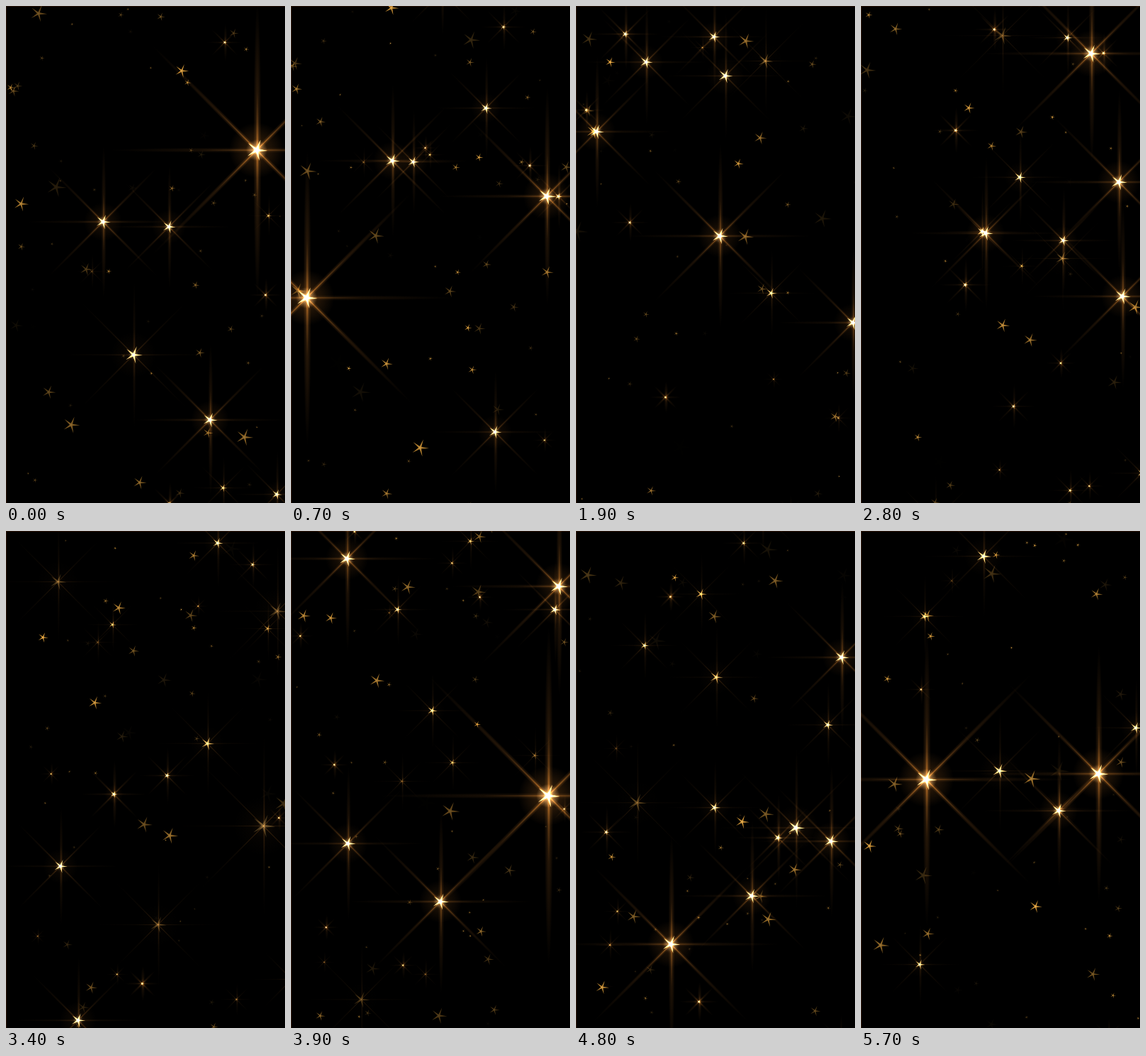
Animation of 394x700 px, one loop 5.8 s. Source, as an HTML page with a canvas:

```html
<!DOCTYPE html>
<html lang="en">
<head>
<meta charset="utf-8">
<title>Golden stars</title>
<style>
html, body { margin: 0; width: 100%; height: 100%; overflow: hidden; background: #000; }
canvas { display: block; }
</style>
</head>
<body>
<canvas id="sky" width="394" height="700"></canvas>
<script>
const ctx = document.getElementById('sky').getContext('2d');
const W = 394, H = 700, LOOP = 5800, STEP = 100;
const TAU = Math.PI * 2;
const FLASH = 650; // ms from dark to the peak of a large flare

let seed = 29;
function rnd() {
  seed = (seed * 16807) % 2147483647;
  return seed / 2147483647;
}

// The large flares: peak time, x, y, radius.
const flares = [
  [0, 354, 203, 13], [0, 137, 304, 9], [0, 230, 311, 8], [0, 288, 583, 9],
  [700, 22, 411, 13], [700, 361, 268, 11], [700, 143, 218, 9], [700, 288, 600, 8],
  [1900, 203, 324, 10], [1900, 29, 177, 9], [1900, 99, 79, 8], [1900, 391, 446, 9],
  [2800, 325, 67, 11], [2800, 364, 248, 10], [2800, 369, 409, 10], [2800, 176, 320, 9],
  [3900, 363, 373, 14], [3900, 211, 522, 10], [3900, 378, 78, 11], [3900, 79, 39, 10],
  [4800, 134, 582, 11], [4800, 375, 178, 9], [4800, 360, 437, 9], [4800, 248, 514, 9],
  [5700, 92, 350, 13], [5700, 335, 342, 12], [5700, 279, 394, 9]
].map(([peak, x, y, r]) => ({ peak, x, y, r, drift: (rnd() - .5) * 26 }));

// Small stars are born at random, rise, grow and dim; some flare on the way.
const stars = Array.from({ length: 290 }, () => {
  const life = 1400 + rnd() * 900;
  return {
    life,
    birth: rnd() * (LOOP + life) - life,
    x: rnd() * W,
    y: rnd() * (H + 60),
    r: 2 + 9 * rnd() ** 2,
    tone: .35 + rnd() * .65,
    flare: rnd() < .2 ? .7 + rnd() * 1.2 : 0,
    drift: (rnd() - .5) * 26
  };
});

// Soft ellipse; long and thin it becomes a ray.
function glow(x, y, rx, ry, angle, rgb, alpha) {
  ctx.save();
  ctx.translate(x, y);
  ctx.rotate(angle);
  ctx.scale(rx, ry);
  const g = ctx.createRadialGradient(0, 0, 0, 0, 0, 1);
  g.addColorStop(0, `rgba(${rgb},${alpha})`);
  g.addColorStop(.15, `rgba(${rgb},${alpha * .6})`);
  g.addColorStop(.4, `rgba(${rgb},${alpha * .22})`);
  g.addColorStop(1, `rgba(${rgb},0)`);
  ctx.fillStyle = g;
  ctx.fillRect(-1, -1, 2, 2);
  ctx.restore();
}

function starShape(x, y, r, color) {
  ctx.beginPath();
  for (let i = 0; i < 10; i++) {
    const a = i * TAU / 10 + .06, d = i % 2 ? r * .18 : r;
    ctx.lineTo(x + Math.cos(a) * d, y + Math.sin(a) * d);
  }
  ctx.fillStyle = color;
  ctx.fill();
}

function drawRays(x, y, r, flare) {
  const len = r * (8 + 2 * flare), thick = 1 + flare * .7;
  const alpha = Math.min(.75, .2 + flare * .15);
  const ray = '215,130,45';
  glow(x + 1, y, thick * 1.5, len, 0, ray, alpha);
  glow(x, y, len, thick, 0, ray, alpha * .65);
  for (const side of [-1, 1]) glow(x, y, len, thick, side * TAU / 8, ray, alpha);
  glow(x, y, r * 3, r * 3, 0, '225,135,45', Math.min(.8, flare * .18));
}

function drawStar(x, y, r, light, flare) {
  if (flare > .1) drawRays(x, y, r, flare);
  const heat = Math.min(1, flare);
  starShape(x, y, r * 1.2, `rgba(242,${172 + heat * 45},${62 + heat * 75},${light})`);
  const core = r * (.35 + heat * .3 + flare * .12);
  glow(x, y, core, core, 0, '255,248,215', light * (.3 + heat * .7));
}

function drawMoving(s, dt, r, light, flare) {
  const rise = 15 + s.r * 5;
  drawStar(s.x + s.drift * dt / 1000, s.y - rise * dt / 1000, r, light, flare);
}

function draw(t) {
  ctx.globalCompositeOperation = 'source-over';
  ctx.fillStyle = '#000';
  ctx.fillRect(0, 0, W, H);
  ctx.fillStyle = '#241004';
  ctx.fillRect(0, 0, 1, H);
  ctx.fillRect(0, 0, W, 1);
  ctx.globalCompositeOperation = 'lighter';

  for (const s of stars) {
    const age = t - s.birth, p = age / s.life;
    if (p <= 0 || p >= 1) continue;
    const fade = Math.min(1, p * 6, (1 - p) * 3);
    const flare = s.flare * Math.sin(p * Math.PI) ** 2;
    const light = Math.min(1, s.tone * fade * (1.1 - p * .7) + flare);
    drawMoving(s, age, s.r * (.7 + p * .5), light, flare);
  }

  for (const s of flares) {
    const dt = t - s.peak;
    if (Math.abs(dt) >= FLASH) continue;
    const show = Math.cos(dt / FLASH * TAU / 4) ** 2;
    drawMoving(s, dt, s.r, Math.min(1, show * 2), (s.r - 5) * .5 * show);
  }
}

const start = performance.now();
function tick() {
  const t = (performance.now() - start) % LOOP;
  draw(Math.floor(t / STEP) * STEP);
  requestAnimationFrame(tick);
}
tick();
</script>
</body>
</html>
```
